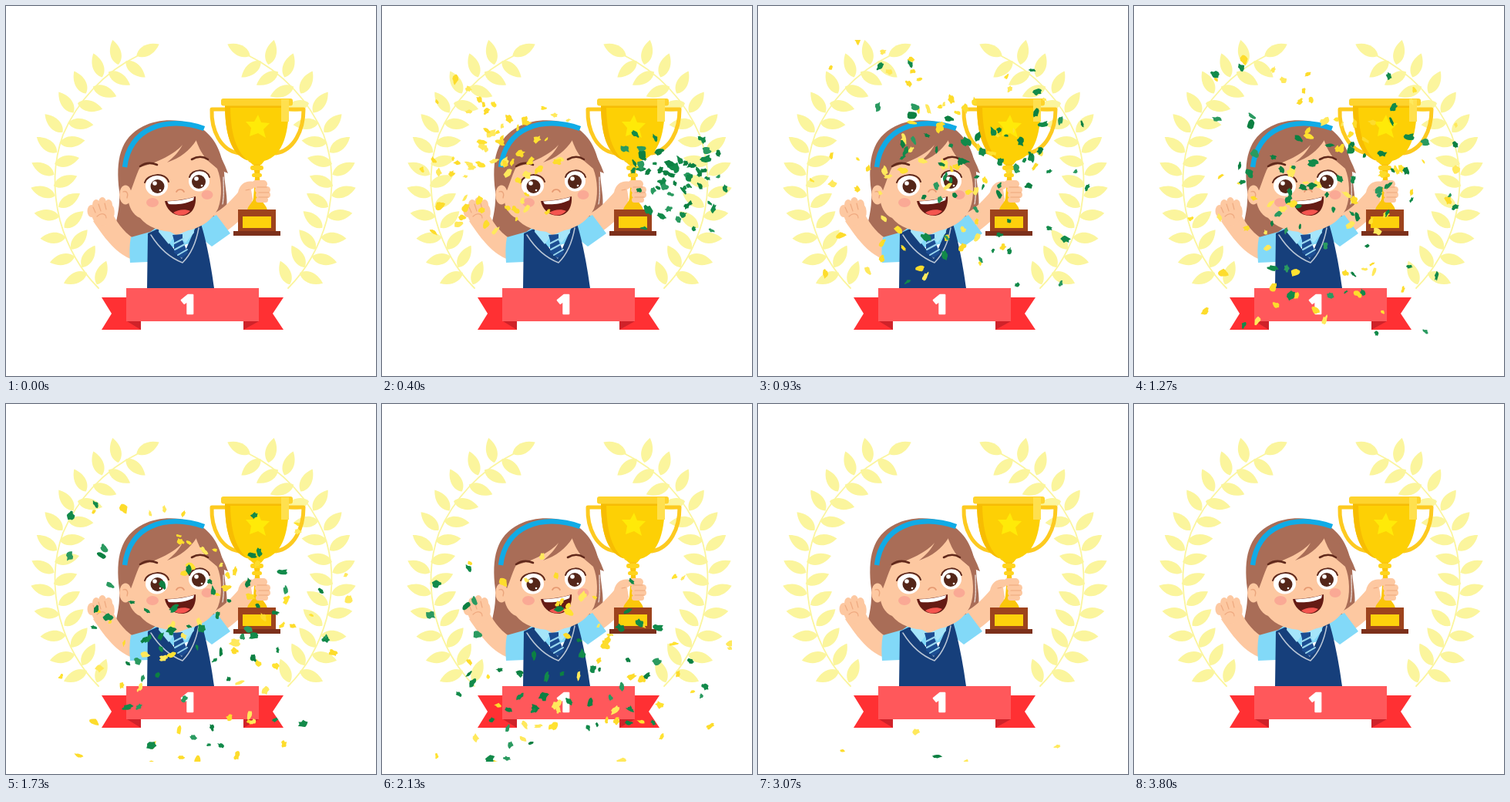
An HTML page with a canvas for the animation above (3.87 s loop, 480x480 px).

```html
<!DOCTYPE html>
<html lang="en">
<head>
<meta charset="utf-8">
<title>First place</title>
<style>
  html, body { margin: 0; width: 100%; height: 100%; overflow: hidden; background: #fff; }
  svg, canvas { position: absolute; left: 0; top: 0; width: 480px; height: 480px; display: block; }
  .skin { fill: #fdc8a1; }
  .hair { fill: #a96d57; }
  .shirt { fill: #82d9f8; }
  .line { fill: none; stroke-linecap: round; stroke-linejoin: round; }
  .band { fill: none; stroke: #10abe6; stroke-width: 6.5; }
</style>
</head>
<body>
<svg viewBox="0 0 480 480">
  <defs>
    <g id="branch" fill="#fbf59d">
      <path class="line" stroke="#fbf59d" stroke-width="1.8" d="M172 64C128 85 92 124 74 167C62 200 60 238 70 278C80 314 96 342 120 366"/>
    </g>
  </defs>
  <use href="#branch"/>
  <use href="#branch" transform="matrix(-1 0 0 1 486 0)"/>

  <!-- back hair and left arm -->
  <path class="hair" d="M147 240C142 200 148 171 178 156C202 144 238 146 258 162C276 177 281 198 283 216C284 236 288 248 286 263L277 275L185 298C172 301 160 302 150 300L141 288C145 272 148 258 147 240Z"/>
  <path d="M282 222C282 238 283 246 281 257" class="line" stroke="#fff" stroke-width="1"/>
  <path class="skin" d="M113 279L136 265C143 279 151 292 166 302L164 329C145 322 131 306 113 279Z"/>
  <g class="skin">
    <path d="M112 259C119 250 135 250 140 262C143 274 137 282 126 285C114 284 108 273 112 259Z"/>
    <ellipse cx="111" cy="266" rx="5.5" ry="8"/>
    <ellipse cx="117" cy="258" rx="5" ry="7"/>
    <ellipse cx="125" cy="255" rx="5" ry="7"/>
    <ellipse cx="133" cy="258" rx="5" ry="7"/>
  </g>
  <path class="line" stroke="#efaa80" stroke-width="1.2" d="M113 261L116 268M120 257L123 266M128 256L130 264M118 273C124 267 130 270 130 275"/>

  <!-- body -->
  <path class="skin" d="M268 270C282 263 292 253 304 238L321 255C311 272 301 281 286 292Z"/>
  <path class="shirt" d="M162 300L187 293L200 284H246L273 271L291 295L267 312L257 304L185 320L184 332L161 333C160 322 160 310 162 300Z"/>
  <path d="M183 366L184 295L197 289L228 328L247 285L253 283C259 301 266 335 270 366Z" fill="#163f7b"/>
  <path class="line" stroke="#b9c6d6" stroke-width="1.5" d="M188 297C198 313 211 326 229 333C240 322 247 305 250 288"/>
  <path class="skin" d="M207 282H240L234 294L222 298L211 292Z"/>
  <path d="M199 285L211 292L220 297L211 309L198 293ZM222 297L239 290L243 284L244 294L233 307Z" fill="#a5e5fa"/>
  <path d="M216 297L229 296L229 304L236 321L228 327L218 320L218 304Z" fill="#1c4d92"/>
  <path class="line" stroke="#9bd8ef" stroke-width="2" d="M218 308L230 302M219 316L232 309M223 323L235 316"/>

  <!-- head -->
  <ellipse class="skin" cx="155" cy="245" rx="8" ry="12.5"/>
  <path class="line" stroke="#eba67d" stroke-width="1.3" d="M152 241C157 239 159 244 157 249"/>
  <path class="skin" d="M247 174C238 188 226 197 209 203C218 196 225 188 229 180C219 192 197 203 174 209C168 220 165 235 158 248C159 260 164 271 174 275C184 287 200 293 220 293C246 293 266 281 275 263C281 248 280 225 274 211C263 201 254 190 247 174Z"/>
  <path class="hair" d="M246 172C252 192 264 208 288 217C283 204 278 193 271 183Z"/>
  <path class="band" d="M154 209C157 184 170 167 188 159C207 150 233 150 257 159"/>
  <path class="line" stroke="#61291b" stroke-width="2.6" d="M174 208C181 203 189 203 196 206M241 199C248 195 256 195 262 199"/>
  <g fill="#fff">
    <ellipse cx="195.500" cy="233" rx="14.500" ry="13.500"/>
    <ellipse cx="250.500" cy="227" rx="13.500" ry="13.500"/>
  </g>
  <path class="line" stroke="#5d281c" stroke-width="2" d="M180 229C184 217 207 215 211 228M238 222C241 211 260 210 264 222"/>
  <g fill="#542619">
    <circle cx="196.500" cy="234" r="9"/>
    <circle cx="250" cy="228" r="9"/>
  </g>
  <g fill="#fff">
    <circle cx="193" cy="230" r="2.8"/><circle cx="200" cy="239" r="1.300"/>
    <circle cx="247" cy="224" r="2.8"/><circle cx="254" cy="233" r="1.300"/>
  </g>
  <g fill="#faa995">
    <ellipse cx="190" cy="255" rx="8" ry="6"/>
    <ellipse cx="261" cy="245" rx="7.5" ry="6"/>
  </g>
  <path class="line" stroke="#e69971" stroke-width="1.7" d="M221 241C223 237 229 237 231 241"/>
  <path d="M206 253C220 253 233 251 246 247C247 262 240 272 228 272C216 272 208 263 206 253Z" fill="#651b14"/>
  <path d="M209 253.500C222 253 234 251 244 248L243 252C232 257 220 258 211 257Z" fill="#fff"/>
  <path d="M217 268C223 264 233 263 239 266C232 273 223 273 217 268Z" fill="#f4554f"/>

  <!-- trophy -->
  <g class="line" stroke="#fdca20" stroke-width="5">
    <path d="M285 134H267C266 161 278 187 302 191"/>
    <path d="M366 134H386C386 161 374 187 350 191"/>
  </g>
  <path d="M284 126H367C367 162 361 194 335 201L331 206H320L316 201C290 194 284 162 284 126Z" fill="#fdd005"/>
  <path d="M284 126H291C291 162 297 192 320 205L316 201C290 194 284 162 284 126Z" fill="#f7bd02"/>
  <path d="M284 129H367V132H284Z" fill="#f6bc04"/>
  <rect x="279" y="120" width="93" height="9.500" rx="3" fill="#fed32c"/>
  <path d="M357 121H367V150H357Z" fill="#ffe04e"/>
  <path d="M327 141L331 151L342 152L334 160L337 171L327 165L316 169L318 158L311 150L322 150Z" fill="#ffea08"/>
  <path d="M321 205H330L329 222L331 249C332 256 338 258 339 265H313C314 258 320 256 321 249L323 222Z" fill="#fbc60b"/>
  <rect x="317" y="207" width="17" height="6" rx="3" fill="#ffd41e"/>
  <rect x="319" y="217" width="13" height="5" rx="2.500" fill="#ffd41e"/>
  <path d="M301 264H350V293H301Z" fill="#9d431d"/>
  <path d="M307 273H344V288H307Z" fill="#fdd10c"/>
  <path d="M295 292H356V298H295Z" fill="#7c301b"/>

  <!-- gripping hand -->
  <path class="skin" d="M301 242C303 231 311 226 321 228C326 231 324 236 318 238L320 250C318 258 313 262 306 259Z"/>
  <g class="skin">
    <rect x="319" y="226" width="20" height="10" rx="5"/>
    <rect x="323" y="234" width="20" height="9" rx="4.500"/>
    <rect x="324" y="241" width="19" height="8" rx="4"/>
    <rect x="324" y="248" width="16" height="7" rx="3.500"/>
  </g>
  <path class="line" stroke="#eda77d" stroke-width="1.200" d="M326 235H338M328 242H341M328 248H340M316 238L311 239"/>

  <!-- ribbon -->
  <path d="M124 378H175V420H124L137 399ZM308 378H360L346 399L360 420H308Z" fill="#ff3033"/>
  <path d="M157 409H175V420ZM328 409H308V420Z" fill="#cf2229"/>
  <path d="M156 366H328V409H156Z" fill="#ff585b"/>
  <text x="236.500" y="399" text-anchor="middle" font-family="'Open Sans', sans-serif" font-weight="800" font-size="34" fill="#fff" stroke="#fff" stroke-width="2.400" stroke-linejoin="round">1</text>
</svg>
<canvas id="confetti" width="480" height="480"></canvas>
<script>
  const LOOP = 3870, STEP = LOOP / 58;

  // Leaves: centres from the top downwards; the angle follows the stem.
  const outer = [[142,60],[119,77],[96,99],[78,125],[62,152],[53,180],[48,211],[48,241],[53,271],[61,301],[73,329],[90,353]];
  const inner = [[168,82],[147,94],[128,111],[109,130],[97,153],[86,176],[79,201],[77,227],[82,252],[88,277],[95,303],[107,325],[124,346]];
  const branch = document.getElementById('branch');

  function addLeaf([x, y], angle) {
    const leaf = document.createElementNS('http://www.w3.org/2000/svg', 'path');
    leaf.setAttribute('d', 'M-16.5 0C-10 -9 4 -10 16.5 0C4 10 -10 9 -16.5 0Z');
    leaf.setAttribute('transform', `translate(${x} ${y}) rotate(${angle})`);
    branch.append(leaf);
  }
  outer.forEach((p, i) => addLeaf(p, -103 - 7 * i - 0.2 * i * i));
  inner.forEach((p, i) => addLeaf(p, 40 - 9 * i));
  addLeaf([184, 57], -27);

  // Confetti: one burst from each side, slowed by drag and pulled down.
  let seed = 41;
  const random = () => (seed = seed * 16807 % 2147483647) / 2147483647;
  const between = (a, b) => a + (b - a) * random();
  const nearMiddle = (a, b) => (between(a, b) + between(a, b)) / 2;

  function makePiece(x, y, dir, start, colors) {
    const radius = between(2.6, 5.6);
    return {
      x, y,
      dx: dir * nearMiddle(0, 460),
      dy: nearMiddle(-310, 145),
      start: start + between(0, 0.07),
      gravity: 38 + 36 * Math.sqrt(random()),
      sway: between(2, 9), phase: between(0, 6.28),
      spin: between(-4, 4), flip: between(3, 7),
      color: colors[Math.floor(random() * colors.length)],
      outline: Array.from({ length: 12 }, (_, i) => {
        const a = i / 12 * 2 * Math.PI, r = radius * between(0.7, 1.4);
        return [Math.cos(a) * r * 1.1, Math.sin(a) * r * 0.85];
      })
    };
  }
  const burst = (count, ...args) => Array.from({ length: count }, () => makePiece(...args));
  const pieces = [
    ...burst(66, 30, 240, 1, 0.04, ['#ffe231', '#fddc2c', '#ffe95c']),
    ...burst(64, 456, 250, -1, 0.17, ['#128a4a', '#0c8042', '#2a9a60'])
  ];

  const ctx = document.getElementById('confetti').getContext('2d');
  ctx.beginPath();
  ctx.rect(32, 44, 422, 420);
  ctx.clip();

  function drawPiece(p, time) {
    const age = time - p.start;
    if (age <= 0) return;
    const spread = 1 - Math.exp(-2.1 * age);
    const x = p.x + p.dx * spread + p.sway * Math.sin(3 * age + p.phase) * spread;
    const y = p.y + p.dy * spread + p.gravity * age * age;
    if (y > 475) return;
    const turn = p.phase + p.spin * age;
    const flat = 0.5 + 0.5 * Math.abs(Math.cos(p.phase + p.flip * age));
    const c = Math.cos(turn), s = Math.sin(turn);
    ctx.fillStyle = p.color;
    ctx.beginPath();
    for (const [u, v] of p.outline) ctx.lineTo(x + u * c - v * flat * s, y + u * s + v * flat * c);
    ctx.fill();
  }

  function render(now) {
    const time = Math.floor(now % LOOP / STEP) * STEP / 1000;
    ctx.clearRect(0, 0, 480, 480);
    for (const p of pieces) drawPiece(p, time);
    requestAnimationFrame(render);
  }
  requestAnimationFrame(render);
</script>
</body>
</html>
```
